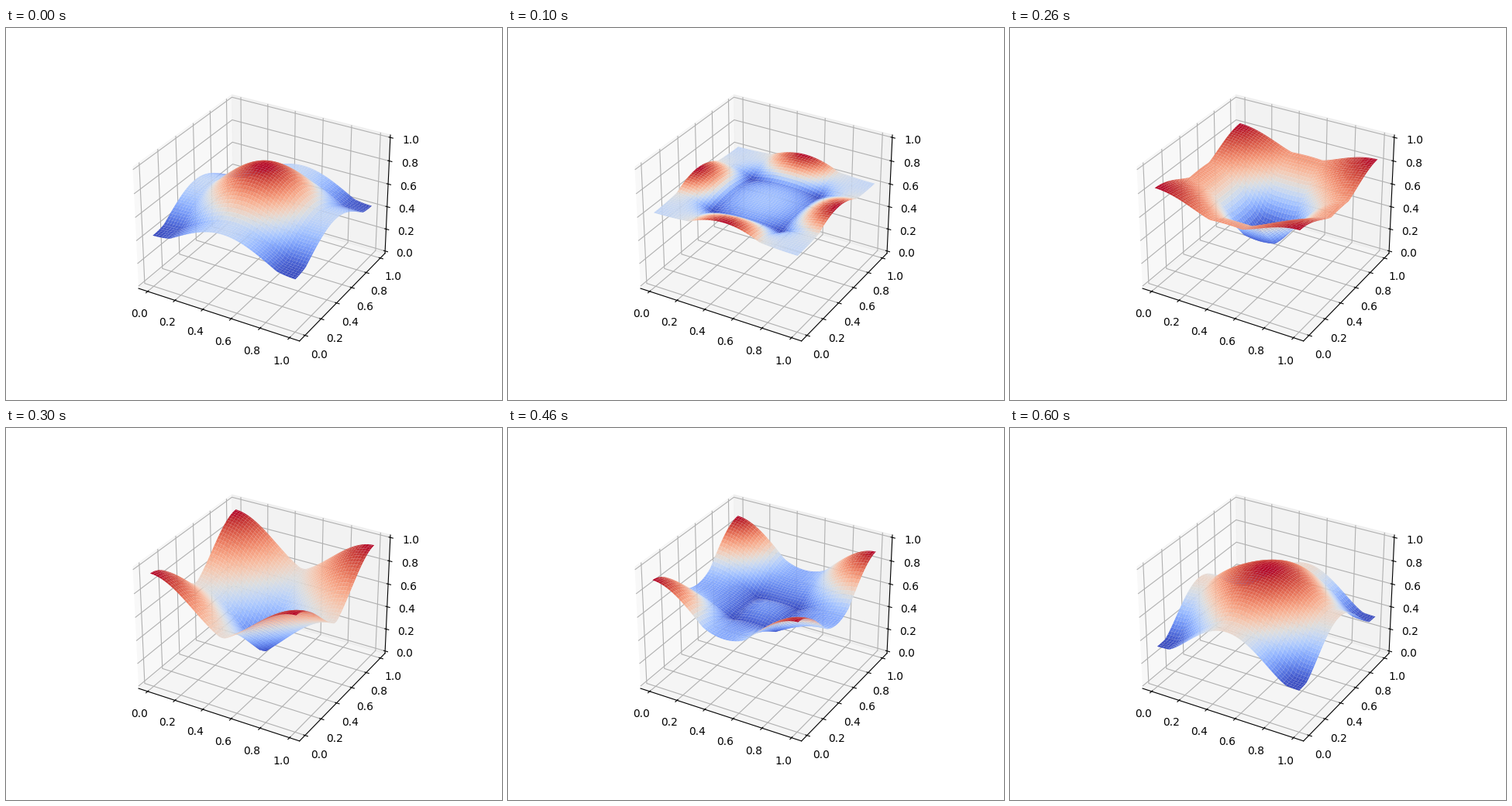
Recreate the animation shown at these times as a matplotlib script. Size 640 by 480 pixels, loop 0.7 s.

```python
import numpy as np
import matplotlib.pyplot as plt
from matplotlib.animation import FuncAnimation

FRAMES, STEP_MS = 7, 100
CELLS, MODES = 100, 40
TRAVEL = .13                       # distance a wave covers per frame
REST, BUMP, SHARP = .22, .8, 4.7   # starting hump: REST + BUMP * exp(-SHARP r^2)

# Standing waves of a unit square with reflecting walls.
x = (np.arange(CELLS) + .5) / CELLS
n = np.arange(MODES)
waves = np.cos(2 * np.pi * np.outer(n, x - .5))
amps = 2 * waves @ np.exp(-SHARP * (x - .5) ** 2) / CELLS
amps[0] /= 2
omega = 2 * np.pi * TRAVEL * np.hypot(n[:, None], n)
X, Y = np.meshgrid(x, x)


def height(t):
    spectrum = BUMP * np.outer(amps, amps) * np.cos(omega * t)
    return REST + waves.T @ spectrum @ waves


fig = plt.figure(figsize=(6.4, 4.8), dpi=100)
ax = fig.add_subplot(projection="3d")
ax.set_zlim(-1 / 48, 1 + 1 / 48)


def draw(k):
    for surface in list(ax.collections):
        surface.remove()
    return [ax.plot_surface(X, Y, height(k + 1), rstride=2, cstride=2,
                            cmap="coolwarm", linewidth=0)]


anim = FuncAnimation(fig, draw, frames=FRAMES, interval=STEP_MS,
                     repeat=True, repeat_delay=0, blit=False)
plt.show()
```
